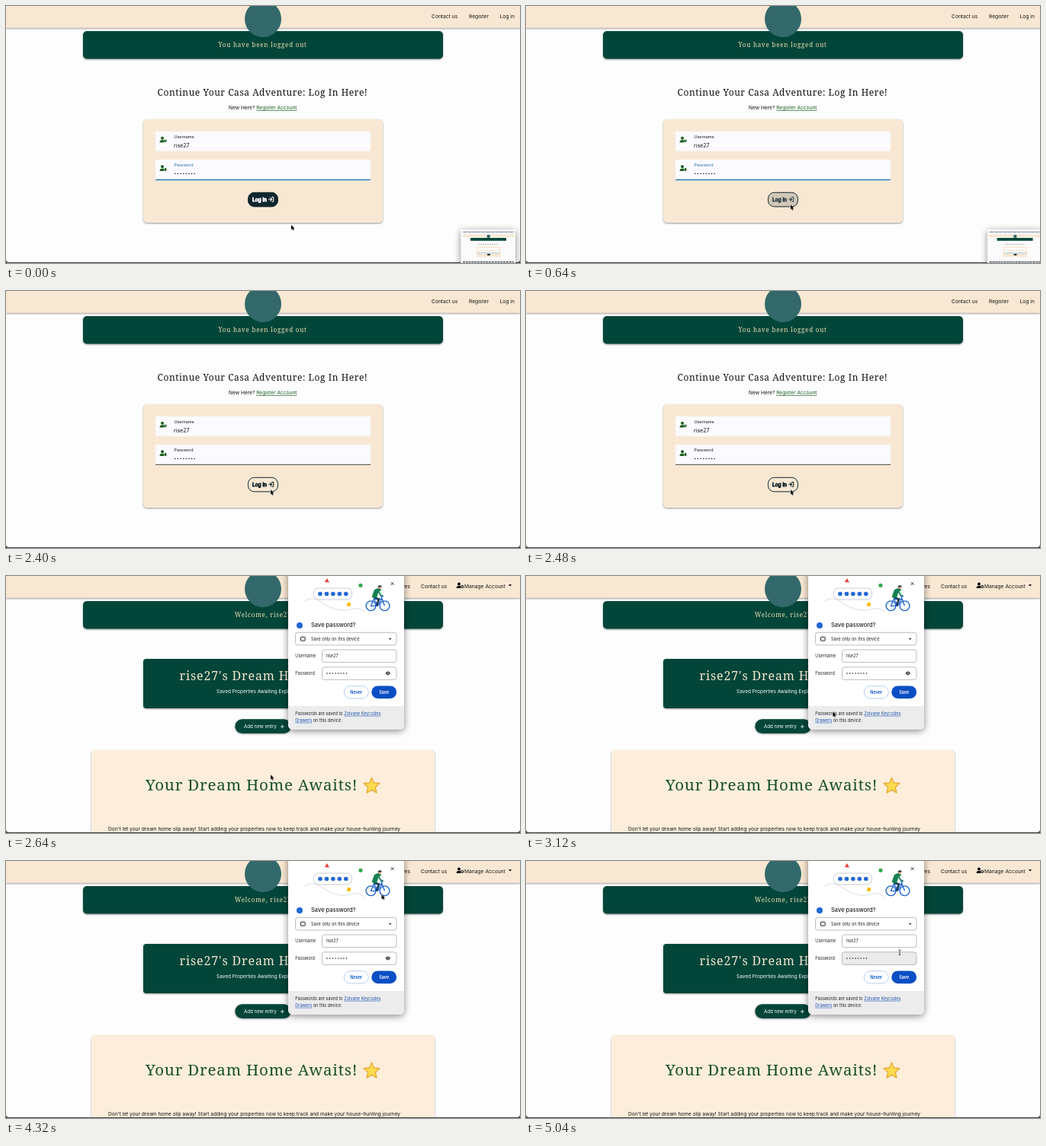
Write an HTML page that moves like this. It is 674x338 px and loops after 5120 ms.

```html
<!DOCTYPE html>
<html lang="en">
<head>
<meta charset="utf-8">
<title>Log in flow</title>
<style>
html, body { margin: 0; width: 100%; height: 100%; overflow: hidden; background: #fdfdfd; }
svg { display: block; width: 100vw; height: 100vh; }
text { font: 6.7px Inter, sans-serif; fill: #111; white-space: pre; }
.serif { font-family: "Noto Serif", serif; }
.banner { font-size: 8px; letter-spacing: .8px; fill: #f3dfb4; }
.h2 { font-size: 12px; letter-spacing: .55px; }
.hero { font-size: 16px; letter-spacing: .87px; fill: #f8e8d3; }
.title { font-size: 20.5px; letter-spacing: .82px; fill: #15502a; }
.small { font-size: 5.4px; }
.pop text { font-size: 5.55px; fill: #222; }
.pop .ask { font-size: 7.5px; font-weight: 500; }
.pop .act { font-weight: 600; fill: #0b57d0; }
.link { text-decoration: underline; fill: #1b5e20; }
.pop .link { fill: #1a56b0; }
.light, .pop .light { fill: #fff; }
.sand { fill: #f8e8d3; }
.green { fill: #024639; }
.line { fill: none; stroke: #111; }
.dots { stroke: #111; stroke-width: 1.6; stroke-linecap: round; stroke-dasharray: 0 3.65; }
.shadow { filter: drop-shadow(0 1px 1px #0006); }
.lift { filter: drop-shadow(0 2px 5px #0007); }

.login, .home, .pop, .btn, .ink, .edge, .label, .thumb, .pointer, .arrow, .beam, .eye, .field {
  animation: 5.12s linear infinite;
}
.login { animation-name: leave; animation-timing-function: step-end; }
.home { animation-name: enter; animation-timing-function: step-end; }
.pop { animation-name: popup; animation-timing-function: step-end; }
.btn { animation-name: btn; stroke: #10262d; }
.ink { animation-name: ink; }
.edge { animation-name: edge; animation-timing-function: step-end; }
.label { animation-name: label; animation-timing-function: step-end; }
.thumb { animation-name: slide; }
.pointer { animation-name: move; }
.arrow, .eye { animation-name: off; animation-timing-function: step-end; }
.beam { animation-name: on; animation-timing-function: step-end; }
.field { animation-name: field; animation-timing-function: step-end; }

@keyframes leave { 0% { visibility: visible } 50%, 100% { visibility: hidden } }
@keyframes enter { 0% { visibility: hidden } 50%, 100% { visibility: visible } }
@keyframes popup { 0% { visibility: hidden } 50.8%, 100% { visibility: visible } }
@keyframes off { 0% { visibility: inherit } 95.7%, 100% { visibility: hidden } }
@keyframes on { 0% { visibility: hidden } 95.7%, 100% { visibility: visible } }
@keyframes field { 0% { fill: #fff } 95.7%, 100% { fill: #ebebeb } }
@keyframes btn {
  0%, 9.4% { fill: #10262d; animation-timing-function: ease }
  15.2%, 100% { fill: #f8e8d3 }
}
@keyframes ink {
  0%, 9.4% { fill: #fff; stroke: #fff; animation-timing-function: ease }
  15.2%, 100% { fill: #10262d; stroke: #10262d }
}
@keyframes edge { 0% { fill: #2385c4; height: 1.5px } 45.3%, 100% { fill: #444; height: 1px } }
@keyframes label { 0% { fill: #1c6ea8 } 45.3%, 100% { fill: #111 } }
@keyframes slide {
  0%, 10.2% { transform: none; animation-timing-function: ease-in-out }
  20.7%, 100% { transform: translateX(86px) }
}
@keyframes move {
  0%, 1.6% { transform: translate(374px, 288px); animation-timing-function: ease-in-out }
  11.5%, 56.25% { transform: translate(347px, 261.5px); animation-timing-function: ease-in-out }
  67.2%, 85.9% { transform: translate(492.5px, 44px); animation-timing-function: ease-in-out }
  96.9%, 100% { transform: translate(490px, 120px) }
}
</style>
</head>
<body>
<svg viewBox="0 0 674 338" preserveAspectRatio="none">
  <defs>
    <g id="user">
      <circle cx="3.4" cy="2" r="2"/>
      <path d="M0 7.6V7a2.6 2.6 0 0 1 2.6-2.5h1.6A2.6 2.6 0 0 1 5.6 5v2.6z"/>
    </g>
  </defs>

  <rect width="674" height="338" fill="#444"/>
  <path d="M0 0H674V333a4 4 0 0 1-4 4H4a4 4 0 0 1-4-4z" fill="#fdfdfd"/>

  <!-- shared header -->
  <rect class="sand shadow" y="-4" width="674" height="32.8"/>
  <rect class="green shadow" x="101" y="33" width="472" height="36.5" rx="5"/>
  <circle cx="337" cy="17" r="24" fill="#33696b"/>

  <g class="login">
    <text x="558" y="16">Contact us</text>
    <text x="607" y="16">Register</text>
    <text x="647.5" y="16">Log in</text>
    <text class="serif banner" x="278.5" y="54">You have been logged out</text>
    <text class="serif h2" x="198.5" y="118">Continue Your Casa Adventure: Log In Here!</text>
    <text x="292" y="136" style="font-size:6.6px">New Here? <tspan class="link">Register Account</tspan></text>

    <rect class="sand shadow" x="180" y="149" width="314" height="136" rx="5"/>
    <g fill="#fbfaff">
      <rect x="196" y="165" width="282" height="26" rx="1"/>
      <rect x="196" y="202" width="282" height="26.5" rx="1"/>
    </g>
    <rect class="edge" x="196" y="227.8" width="282" height="1.5"/>
    <g fill="#1b5e20">
      <use href="#user" x="201.6" y="171.8"/>
      <circle cx="208.8" cy="177.3" r="1.9"/>
      <use href="#user" x="201.6" y="209.3"/>
      <rect x="207.7" y="213.2" width="2.8" height="3.6" rx=".6"/>
    </g>
    <circle cx="208.8" cy="177.3" r=".7" fill="#fbfaff"/>
    <text class="small" x="220.5" y="174">Username</text>
    <text x="220" y="185.5" style="font-size:7px">rise27</text>
    <text class="small label" x="220.5" y="211">Password</text>
    <path class="dots" d="M221.7 220.5h25.7"/>

    <rect class="btn" x="317.5" y="245.3" width="39" height="18.6" rx="8"/>
    <text class="ink" x="323" y="256.8" style="font-size:6.5px;stroke:none">Log in</text>
    <g class="ink" style="fill:none" stroke-width="1.1" stroke-linecap="round" stroke-linejoin="round">
      <path style="fill:none" d="M344.6 254.3h3.8m-1.7-2 2 2-2 2M348.8 251.4h1.1q.8 0 .8.8v4.2q0 .8-.8.8h-1.1"/>
    </g>
  </g>

  <g class="home">
    <text x="530" y="16" text-anchor="end">Features</text>
    <text x="544" y="16">Contact us</text>
    <use href="#user" x="590.6" y="8.4"/>
    <circle class="line" cx="598.2" cy="14" r="1.5" stroke-width="1.1"/>
    <text x="601" y="16">Manage Account</text>
    <path d="M658.8 11.2h4.4l-2.2 2.3z"/>
    <text class="serif banner" x="300" y="54">Welcome, rise27</text>

    <rect class="green shadow" x="180" y="109" width="314" height="65" rx="4"/>
    <text class="serif hero" x="227.5" y="137">rise27's Dream Home List</text>
    <text class="light" x="276" y="153.5" style="font-size:6.45px">Saved Properties Awaiting Exploration</text>
    <rect class="green shadow" x="300.3" y="188.3" width="73.5" height="18.8" rx="9.4"/>
    <text class="light" x="312" y="200" style="font-size:6.2px">Add new entry</text>
    <path d="M360 198h4.6m-2.3-2.3v4.6" stroke="#fff" stroke-width=".8"/>

    <path class="shadow" d="M112 340V234a5 5 0 0 1 5-5H557a5 5 0 0 1 5 5V340z" fill="#fdeedb"/>
    <text class="serif title" x="183" y="282">Your Dream Home Awaits!</text>
    <path d="M479.5 265.2l3 6.8 7.4.8-5.5 5 1.6 7.3-6.5-3.7-6.5 3.7 1.6-7.3-5.5-5 7.4-.8z"
      fill="#fddb50" stroke="#e8ab37" stroke-width="1.4" stroke-linejoin="round"/>
    <text x="134" y="334.5" style="font-size:6.6px">Don't let your dream home slip away! Start adding your properties now to keep track and make your house-hunting journey</text>
    <rect y="337" width="674" height="1" fill="#444"/>
  </g>

  <g class="pop">
    <rect class="lift" x="370" y="-10" width="152" height="212" rx="6" fill="#fff"/>
    <path d="M370 171H522V196a6 6 0 0 1-6 6H376a6 6 0 0 1-6-6z" fill="#ececed"/>

    <!-- illustration -->
    <path d="M390 34C399 28 405 29 413 34S432 46 445 45s15-6 25 2" fill="none" stroke="#d0d3d8" stroke-width=".8"/>
    <rect x="403.5" y="16" width="50" height="15" rx="6" fill="#fff" stroke="#c9cdd3"/>
    <path d="M412 23.5h34" stroke="#2167d5" stroke-width="5.6" stroke-linecap="round" stroke-dasharray="0 8.45"/>
    <path d="M421 3l3 5.6-6.2-.6z" fill="#e94335"/>
    <circle cx="465" cy="12.3" r="2.6" fill="#34a853"/>
    <rect x="447.2" y="35" width="4.8" height="4.8" rx=".6" fill="#fbbc04" transform="rotate(18 449.6 37.4)"/>
    <g fill="none" stroke="#1b62cd" stroke-width="1.3" stroke-linejoin="round">
      <circle cx="478.5" cy="39.3" r="6.4"/>
      <circle cx="496.5" cy="39.3" r="6.4"/>
      <path d="M478.5 39.3l4-9h10l-5 9zM482.4 30l5.1 9.3M496.5 39.3l-4.6-12.5h3"/>
    </g>
    <path d="M482 28l7 2.5-3 8.5" fill="none" stroke="#173a63" stroke-width="2.6" stroke-linejoin="round"/>
    <path d="M479.5 28l3.5-10 5.5-2.5 4 3-4 2.5-2.5 8z" fill="#168052"/>
    <path d="M488.5 20l2.5 5 3.5 1" fill="none" stroke="#168052" stroke-width="1.8"/>
    <circle cx="490.3" cy="15" r="2.2" fill="#e5a98a"/>
    <path d="M487.7 15a2.7 2.7 0 0 1 5.2-1z" fill="#222d40"/>

    <path class="line" d="M504.6 8l4 4m0-4-4 4" stroke-width=".8"/>
    <circle cx="385" cy="65" r="4" fill="#2167d5"/>
    <text class="ask" x="400" y="67.3">Save password?</text>

    <g fill="#fff" stroke="#a9acb1" stroke-width=".8">
      <rect x="379.5" y="74.3" width="132.5" height="16.6" rx="3"/>
      <rect x="414.5" y="97" width="97.5" height="16.6" rx="3"/>
      <rect class="field" x="414.5" y="119.8" width="97.5" height="16.6" rx="3"/>
      <rect x="443.3" y="144.7" width="32" height="16.3" rx="8.1" stroke="#a8c1e8"/>
    </g>
    <circle cx="389.3" cy="82.8" r="5" fill="#e9eaec"/>
    <rect class="line" x="386.5" y="80.3" width="5.6" height="4.8" rx=".8" stroke-width=".8"/>
    <text x="400" y="84.8">Save only on this device</text>
    <path d="M501.7 81.7h4l-2 2.2z" fill="#333"/>
    <text x="379.3" y="107">Username</text>
    <text x="419.5" y="107">rise27</text>
    <text x="379.3" y="130">Password</text>
    <path class="dots" d="M421 128h25.7"/>
    <g class="eye">
      <path d="M497.6 128q3.2-4.8 6.4 0-3.2 4.8-6.4 0z" fill="#222"/>
      <circle cx="500.8" cy="128" r="1.2" fill="#222" stroke="#fff" stroke-width=".6"/>
    </g>
    <text class="act" x="459.3" y="155" text-anchor="middle">Never</text>
    <rect x="479.3" y="144.4" width="32.8" height="16.9" rx="8.4" fill="#0b4fc4"/>
    <text class="act light" x="495.7" y="155" text-anchor="middle">Save</text>
    <text x="379.3" y="182.8">Passwords are saved to <tspan class="link">Zolvane Keycodes</tspan></text>
    <text x="379.3" y="191.8"><tspan class="link">Drawers</tspan> on this device.</text>
  </g>

  <!-- screenshot preview -->
  <g class="thumb">
    <rect class="lift" x="596.5" y="294" width="71.5" height="50" rx="2" fill="#fff"/>
    <rect x="598.5" y="296" width="68" height="42" fill="#fbfbfb"/>
    <rect x="598.5" y="296" width="68" height="2.5" fill="#cfd3dc"/>
    <path d="M600 297.3h64" stroke="#8796a8" stroke-width=".8" stroke-dasharray="4 2"/>
    <rect class="sand" x="598.5" y="300.5" width="68" height="3.5"/>
    <rect class="green" x="609" y="305" width="47" height="3.8" rx=".6"/>
    <circle cx="632.7" cy="303" r="2.3" fill="#33696b"/>
    <path d="M619 313.3h27" stroke="#999" stroke-width=".8" stroke-dasharray="2 1"/>
    <rect class="sand" x="617" y="316.5" width="31.5" height="13.5" rx=".6"/>
    <path d="M618.6 319.5h28.3m-28.3 4h28.3" stroke="#fff" stroke-width="2.4"/>
    <path d="M618.6 324.8h28.3" stroke="#2385c4" stroke-width=".4"/>
    <rect x="631" y="326" width="4" height="2" rx=".8" fill="#10262d"/>
    <path d="M599 336.6h67" stroke="#59616e" stroke-width="1.6" stroke-dasharray="3 .8"/>
  </g>

  <g class="pointer">
    <path class="arrow" d="M0 0V6.2L1.5 4.9 2.5 7.2 3.6 6.7 2.6 4.5H4.6z" stroke="#fff" stroke-width=".7" paint-order="stroke"/>
    <path class="beam line" d="M-1.3-3.2Q0-3.2 0-2.2 0-3.2 1.3-3.2M0-2.2V2.8M-1.3 3.6Q0 3.6 0 2.8 0 3.6 1.3 3.6" stroke-width=".7"/>
  </g>
</svg>
</body>
</html>
```
